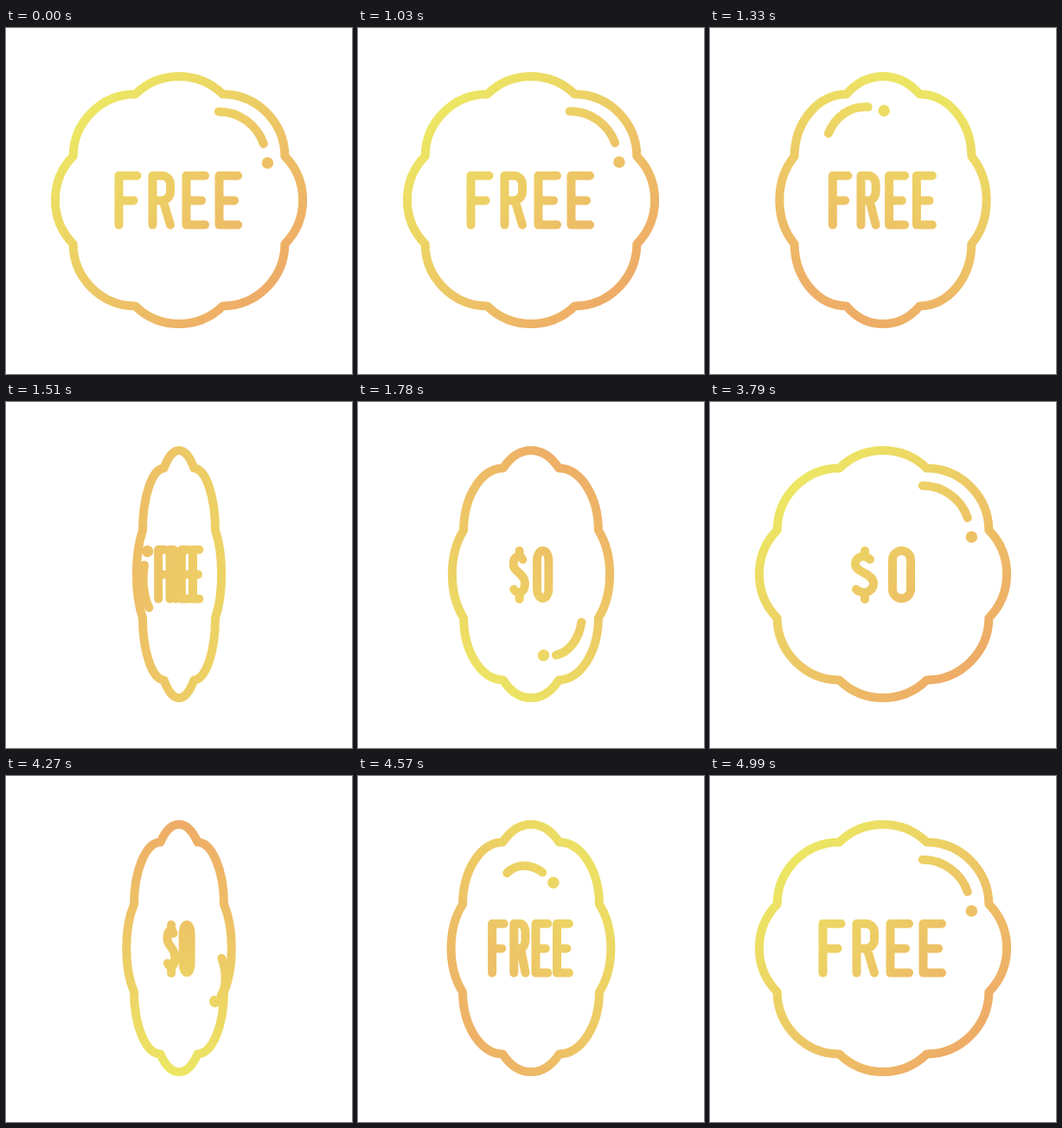
An HTML page with a canvas for the animation above (5.02 s loop, 400 by 400 pixels).

```html
<!DOCTYPE html>
<html lang="en">
<head>
<meta charset="utf-8">
<title>Free badge</title>
<style>
  html, body { margin: 0; width: 100%; height: 100%; overflow: hidden; background: #fff; }
  canvas { display: block; width: 100vw; height: 100vh; }
</style>
</head>
<body>
<canvas id="stage" width="400" height="400" role="img" aria-label="FREE, $0"></canvas>
<script>
const ctx = document.getElementById('stage').getContext('2d');
const LOOP = 5020;
const TAU = Math.PI * 2;
const RAD = Math.PI / 180;

// Monoline lettering, relative to the badge centre.
const LABELS = {
  FREE: new Path2D(
    'M-69.5 28.6V-28.3H-48.5M-69.5 .4H-52.5' +
    'M-30.5 28.6V-28.3H-20A10 10 0 0 1-10-18.3V-10A10 10 0 0 1-20 .4H-30.5M-18.5 .4L-10 28.6' +
    'M30-28.3H8.5V28.6H30M8.5 .4H26M68-28.3H46.5V28.6H68M46.5 .4H64'),
  ZERO: new Path2D(
    'M-21-27V-22M-21 23V29M-15-17C-20-23-32-21-32-11.5C-32-2-11-1-11 10.5C-11 22-25 24-31 17.5' +
    'M11-16.5A10.5 10.5 0 0 1 32-16.5V17.5A10.5 10.5 0 0 1 11 17.5Z')
};

const smooth = t => t * t * (3 - 2 * t);
const easeInOut = (t, power) =>
  t < .5 ? (2 * t) ** power / 2 : 1 - (2 - 2 * t) ** power / 2;

// spin: turn of the highlight; tint: direction of the gradient's full turn;
// squash and tilt: how far the highlight flattens and leans in mid-flip.
const FLIPS = [
  { start: 1003, length: 1195, from: 'FREE', to: 'ZERO', tint: 1,
    squash: .23, tilt: 0, spin: p => -TAU * p },
  { start: 3780, length: 1210, from: 'ZERO', to: 'FREE', tint: -1,
    squash: .355, tilt: .245, spin: p => TAU * easeInOut(p, 2.7) }
];

function poseAt(time) {
  const flip = time < 2500 ? FLIPS[0] : FLIPS[1];
  const p = smooth(Math.min(1, Math.max(0, (time - flip.start) / flip.length)));
  const depth = Math.sin(Math.PI * p) ** 2;
  return {
    width: Math.max(.004, Math.abs(Math.cos(Math.PI * p))),
    height: 1 - flip.squash * depth,
    lean: flip.tilt * depth,
    spin: flip.spin(p),
    tint: Math.PI / 4 + flip.tint * TAU * p,
    label: p < .5 ? flip.from : flip.to
  };
}

function tintGradient(angle) {
  const x = 144 * Math.cos(angle), y = 144 * Math.sin(angle);
  const gradient = ctx.createLinearGradient(-x, -y, x, y);
  gradient.addColorStop(0, '#ece663');
  gradient.addColorStop(1, '#eeac67');
  return gradient;
}

function badgePath() {
  const path = new Path2D();
  const half = 44.4 * RAD;
  for (let i = 0; i < 8; i++) {
    const a = i * TAU / 8;
    path.arc(70.7 * Math.cos(a), 70.7 * Math.sin(a), 72.4, a - half, a + half);
  }
  path.closePath();
  return path;
}

const badge = badgePath();
const shine = new Path2D();
shine.arc(45.8, -47.2, 55, -90 * RAD, -19 * RAD);
const dot = new Path2D('M102.4-43h.01');

// Transforms the geometry only, so the line weight stays constant.
function strokeShape(path, matrix, weight = 10) {
  const shape = new Path2D();
  shape.addPath(path, matrix);
  ctx.lineWidth = weight;
  ctx.stroke(shape);
}

function draw(time) {
  const { width, height, lean, spin, tint, label } = poseAt(time);
  const flat = new DOMMatrix([width, 0, 0, 1, 0, 0]);
  const turned = new DOMMatrix([width, 0, lean * height, height, 0, 0]).rotate(spin / RAD);
  ctx.setTransform(1, 0, 0, 1, 0, 0);
  ctx.clearRect(0, 0, 400, 400);
  ctx.translate(200, 199);
  ctx.lineCap = ctx.lineJoin = 'round';
  ctx.strokeStyle = tintGradient(tint);
  strokeShape(badge, flat);
  strokeShape(LABELS[label], flat);
  strokeShape(shine, turned);
  strokeShape(dot, turned, 13.5);
}

const begin = performance.now();
function tick() {
  draw((performance.now() - begin) % LOOP);
  requestAnimationFrame(tick);
}
tick();
</script>
</body>
</html>
```
